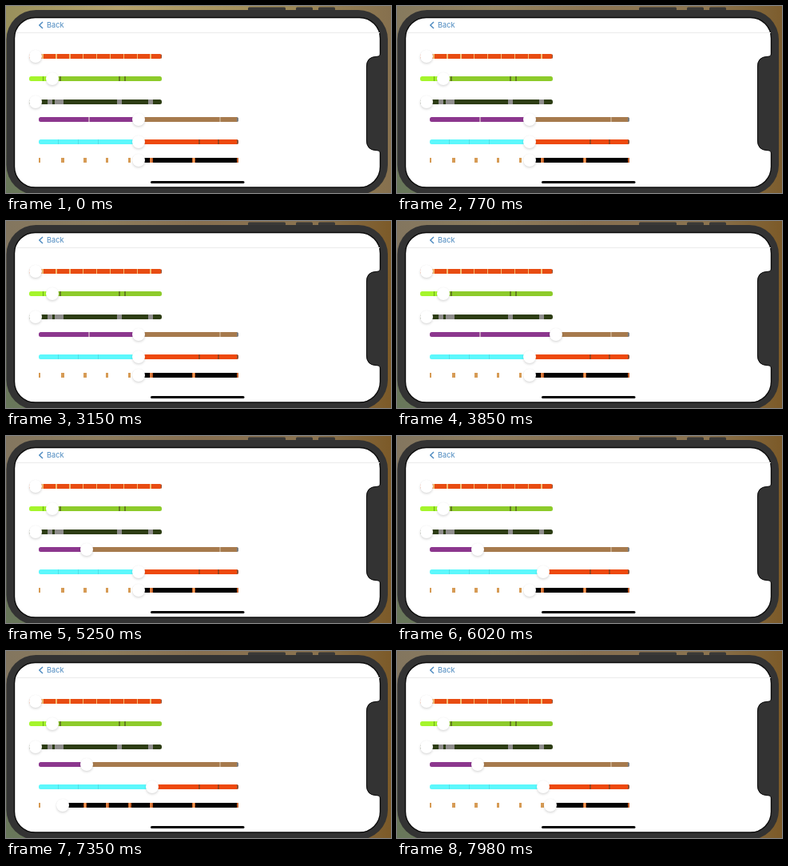
An HTML page for the animation above (8 s loop, 482 by 234 pixels).

```html
<!DOCTYPE html>
<html lang="en">
<head>
<meta charset="utf-8">
<title>Sliders</title>
<style>
@property --x { syntax: "<length>"; inherits: true; initial-value: 0px; }
html, body { margin: 0; width: 100%; height: 100%; overflow: hidden; background: #fff; }
#stage { position: relative; width: 482px; height: 234px; overflow: hidden; }
#stage > svg { position: absolute; left: 0; top: 0; }
.light { animation: dim 8s linear infinite; }
.slider { position: absolute; left: 0; top: 0; }
.track, .clip { position: absolute; overflow: hidden; }
.clip { left: 20px; top: -5px; height: 10px; width: calc(var(--x) - 20px); background: #fff; }
.track { top: -3px; height: 6px; filter: blur(.45px); }
.clip .track { top: 2px; margin-left: -20px; }
.track i { position: absolute; top: 0; height: 100%; }
.thumb {
  position: absolute; left: calc(var(--x) - 8px); top: -8px; width: 16px; height: 16px;
  border-radius: 50%; background: #fff;
  box-shadow: 0 1.5px 3px rgba(0,0,0,.15), 0 0 1px rgba(0,0,0,.06);
}
.s4 { animation: s4 8s infinite; }
.s5 { animation: s5 8s infinite; }
.s6 { animation: s6 8s infinite; }
@keyframes dim { 0%, .8% { opacity: 1 } 3.5%, 7% { opacity: .4 } 11.4%, 100% { opacity: 0 } }
@keyframes s4 {
  0%, 41% { --x: 166px; animation-timing-function: ease-in-out }
  48.1% { --x: 199px; animation-timing-function: ease-in-out }
  53.4%, 100% { --x: 101px }
}
@keyframes s5 {
  0%, 65.6% { --x: 166px; animation-timing-function: ease-in-out }
  73.6%, 100% { --x: 183px }
}
@keyframes s6 {
  0%, 82.2% { --x: 166px; animation-timing-function: ease-in-out }
  91.8%, 93.8% { --x: 71px; animation-timing-function: ease-in-out }
  99.7%, 100% { --x: 192px }
}
</style>
</head>
<body>
<div id="stage">
  <svg width="482" height="234" viewBox="0 0 482 234">
    <defs>
      <linearGradient id="dark">
        <stop offset="0" stop-color="#83765f"/><stop offset=".25" stop-color="#8d7c5c"/>
        <stop offset=".5" stop-color="#876f50"/><stop offset=".8" stop-color="#8a7350"/>
        <stop offset="1" stop-color="#7c5a28"/>
      </linearGradient>
      <linearGradient id="pale">
        <stop offset="0" stop-color="#99905c"/><stop offset=".3" stop-color="#b5a16a"/>
        <stop offset=".7" stop-color="#a08c58"/><stop offset="1" stop-color="#86704e"/>
      </linearGradient>
      <radialGradient id="moss" gradientUnits="userSpaceOnUse" cx="0" cy="234" r="200">
        <stop offset="0" stop-color="#67775a"/><stop offset="1" stop-color="#67775a" stop-opacity="0"/>
      </radialGradient>
    </defs>
    <rect width="482" height="234" fill="url(#dark)"/>
    <rect class="light" width="482" height="234" fill="url(#pale)"/>
    <rect width="482" height="234" fill="url(#moss)"/>
    <g fill="#3a3937">
      <rect x="303" y="1.5" width="47" height="6" rx="1.5"/>
      <rect x="363" y="1.5" width="21" height="6" rx="1.5"/>
      <rect x="391" y="1.5" width="21" height="6" rx="1.5"/>
    </g>
    <rect x=".5" y="5" width="477.5" height="231" rx="37" fill="#333"/>
    <rect x="10.5" y="14.5" width="458" height="212.5" rx="26" fill="#fff" stroke="#0c0c0c" stroke-width="1.4"/>
    <path d="M12 33.5H468" stroke="#ebebeb"/>
    <path d="M470 58C469 62 467 63 463 63Q451 64 451 76V168Q451 180 463 181C467 181 469 182 470 186Z" fill="#333"/>
    <path d="M468.5 60C468 62.5 467 63.3 463 63.4Q451.5 64 451.5 76V168Q451.5 180 463 180.6C467 180.7 468 181.5 468.5 184" fill="none" stroke="#0c0c0c"/>
    <path d="M46 20L41.8 24L46 28" fill="none" stroke="#4a88bf" stroke-width="1.4"/>
    <text x="51" y="27.4" font-family="Inter, sans-serif" font-size="9.2" fill="#4a88bf">Back</text>
    <rect x="181" y="219" width="117.5" height="3" rx="1.5" fill="#000"/>
  </svg>
</div>
<script>
const stage = document.getElementById("stage");

function add(parent, tag, name, style) {
  const el = document.createElement(tag);
  el.className = name;
  Object.assign(el.style, style);
  parent.append(el);
  return el;
}

// Marks are [color, width, ...centers].
function track(parent, from, to, color, marks, radius) {
  const el = add(parent, "div", "track", {
    left: from + "px", width: to - from + "px", background: color, borderRadius: radius + "px"
  });
  for (const [fill, w, ...xs] of marks)
    for (const x of xs)
      add(el, "i", "", { left: x - w / 2 - from + "px", width: w + "px", background: fill });
}

function slider(name, y, x, from, to, min, max, radius = 2.5) {
  const el = add(stage, "div", "slider " + name, { top: y + "px" });
  el.style.setProperty("--x", x + "px");
  track(el, from, to, max[0], max.slice(1), radius);
  track(add(el, "div", "clip", {}), from, to, min[0], min.slice(1), radius);
  add(el, "div", "thumb", {});
}

const steps = Array.from({ length: 9 }, (_, i) => 46 + i * 16.9);
const tan = "#d69b55";
const rust = "#c4602a";

slider("s1", 63, 37, 29, 195, ["#e84c12"],
  ["#e84c12", ["#f3bd73", 1.6, ...steps], ["#87533b", 1.5, 194.5]]);
slider("s2", 91, 58, 29, 195, ["#a5f52c", ["#6ba81f", 1, 46.5]],
  ["#8dcb2b", ["#657f21", 1.2, 68, 142, 149]]);
slider("s3", 119.5, 37, 29, 195, ["#2d3d14"],
  ["#2d3d14", ["#8f8d8c", 6, 55, 142, 180.5], ["#8f8d8c", 11, 66]]);
slider("s4", 142, 166, 41, 291, ["#8c378e", ["#c094b8", 1.3, 104]],
  ["#a67a4d", ["#c1a17e", 1.3, 268], ["#798088", 2, 290]]);
slider("s5", 170, 166, 41, 291, ["#5cf8fc", ["#52dfe7", 1, 65, 90, 115]],
  ["#ee490c", ["#99451f", 1.2, 242, 266], ["#87533b", 2, 290]]);
slider("s6", 193, 166, 41, 291,
  ["#fff", [tan, 3.5, 71, 99, 126.5, 154.5, 182], [tan, 2, 42]],
  ["#000", [rust, 4, 71, 99, 126.5, 154.5, 181.5, 235], ["#f09a55", 1.5, 99, 126.5, 154.5, 181.5, 235], [rust, 2.5, 290]], 0);
</script>
</body>
</html>
```
